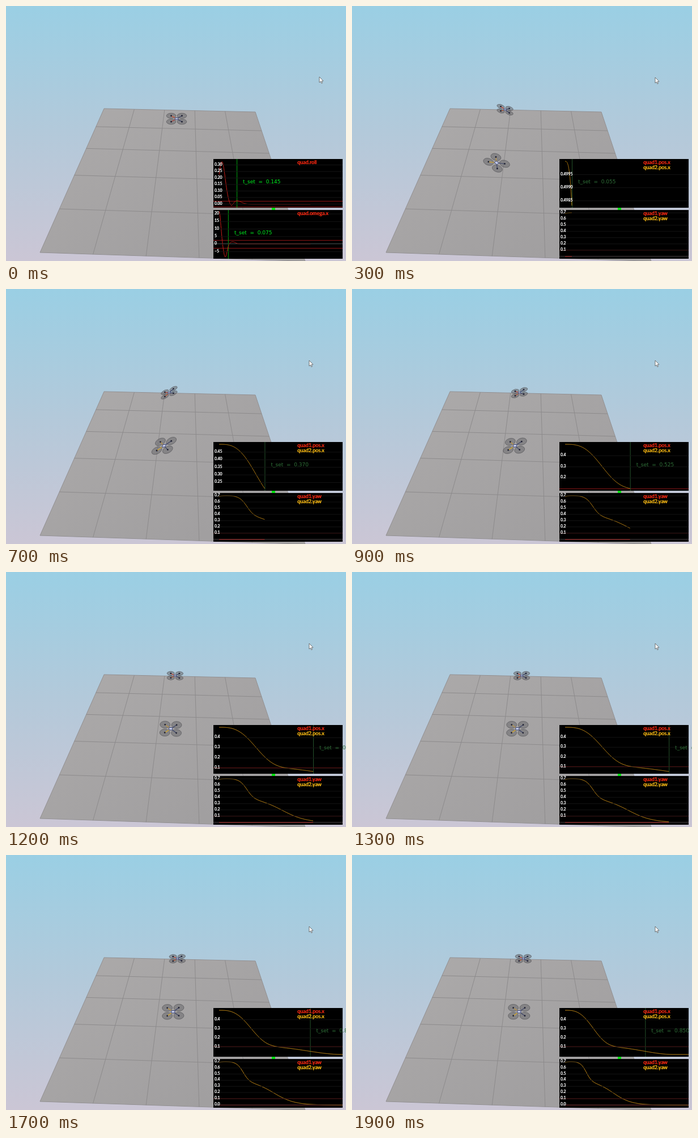
Animation, 600 px wide and 450 px high, one loop 2000 ms. Source, as an HTML page with a canvas:

```html
<!DOCTYPE html>
<html lang="en">
<head>
<meta charset="utf-8">
<title>Quadrotor simulation</title>
<style>
html, body { margin: 0; width: 100%; height: 100%; overflow: hidden; }
canvas { display: block; width: 600px; height: 450px; }
</style>
</head>
<body>
<canvas id="stage" width="600" height="450"></canvas>
<script>
const ctx = document.getElementById('stage').getContext('2d');
const X0 = 376, SPAN = 218;      // plot origin and pixels per second
const RED = '#ff2a12', YELLOW = '#ffbe14', RED_TRACE = '#cc1f18', ORANGE_TRACE = '#dc9a1a';
const DARK_RED = '#8f1414', GRID = '#141414';
const SETTLED = 0.85;

const bump = (t, center, width) => Math.exp(-(((t - center) / width) ** 2));
const logistic = (t, center, width) => 1 / (1 + Math.exp((center - t) / width));
const smooth = (t, from, to) => {
  const u = Math.min(1, Math.max(0, (t - from) / (to - from)));
  return u * u * (3 - 2 * u);
};

// Distance flown: a quick approach followed by a slow correction.
const flown = t => 0.407 * (1 - Math.exp(-25 * t ** 3)) + 0.0785 * smooth(t, 0.5, 1.15);
const accel = (t, h = 0.02) => (flown(t + h) - 2 * flown(t) + flown(t - h)) / (h * h);

// Plot heights in pixels against time.
const yawY = t => 364 + 35 * logistic(t, 0.225, 0.03) + 43 * logistic(t, 0.511, 0.096) + 2 * Math.exp(-t / 0.03);
const rollY = t => 349.8 - 75 * bump(t, 0.023, 0.038) + 6 * bump(t, 0.1, 0.02) - 6 * bump(t, 0.145, 0.05);
const omegaY = t => 420 - 58 * bump(t, 0, 0.02) + 23 * bump(t, 0.05, 0.02) - 4 * bump(t, 0.11, 0.03);
const yawAngle = t => Math.max(0, (441.8 - yawY(t)) / 110);

function line(color, x1, y1, x2, y2, width = 1) {
  ctx.strokeStyle = color;
  ctx.lineWidth = width;
  ctx.beginPath();
  ctx.moveTo(x1, y1);
  ctx.lineTo(x2, y2);
  ctx.stroke();
}

function shape(points, fill, stroke, width) {
  ctx.beginPath();
  points.forEach(p => ctx.lineTo(p[0], p[1]));
  ctx.closePath();
  ctx.fillStyle = fill;
  ctx.fill();
  ctx.strokeStyle = stroke;
  ctx.lineWidth = width;
  ctx.stroke();
}

function text(str, x, y, color, font) {
  ctx.font = font;
  ctx.fillStyle = color;
  ctx.fillText(str, x, y);
}

// Plot lettering is overprinted with a slight shift.
function overprint(str, x, y, color, size) {
  for (const dx of [0, 0.5]) text(str, x + dx, y, color, size + 'px Lato, sans-serif');
}
const label = (str, y) => overprint(str, 367.8, y + 2.5, '#fff', 6.8);
const heading = (str, y, color) => overprint(str, 514, y + 3, color, 9);

function world() {
  const sky = ctx.createLinearGradient(0, 0, 0, 450);
  sky.addColorStop(0, '#9acfe4');
  sky.addColorStop(0.5, '#b3c9da');
  sky.addColorStop(1, '#cbc6d5');
  ctx.fillStyle = sky;
  ctx.fillRect(0, 0, 600, 450);

  const mix = (p, q, u) => [p[0] + (q[0] - p[0]) * u, p[1] + (q[1] - p[1]) * u];
  const tl = [173, 181], tr = [440, 187], bl = [60, 435], br = [528, 450.5];
  const floor = ctx.createLinearGradient(150, 181, 330, 450);
  floor.addColorStop(0, '#aba9a9');
  floor.addColorStop(1, '#a19fa0');
  shape([tl, tr, br, bl], floor, '#929092', 1);
  for (let k = 1; k < 5; k++) {
    const across = k / 5, deep = k / (k + (5 - k) * 1.74);
    line('#8d8b8c', ...mix(tl, tr, across), ...mix(bl, br, across));
    line('#8d8b8c', ...mix(tl, bl, deep), ...mix(tr, br, deep));
  }
  ctx.fillStyle = '#00e010';
  ctx.fillRect(469, 355, 6, 6);
}

// rx, ry: rotor circle as seen by the camera; tilt lowers the right-hand side.
function drone(x, y, rx, ry, yaw, tilt, arms) {
  const project = angle => {
    const px = rx * Math.cos(angle);
    return [px, ry * Math.sin(angle) + tilt * px];
  };
  const quarter = Math.PI / 2;
  const hubs = [-3, -1, 1, 3].map(k => project(k * quarter / 2 + yaw));
  const [a, b] = hubs;
  const colors = [arms[0], '#3c4468', '#3c4468', arms[1]];
  ctx.save();
  ctx.translate(x, y);
  hubs.forEach(([hx, hy], i) => {
    // The rotor disc lies in the plane of the two diagonals.
    ctx.save();
    ctx.transform(...a, ...b, hx, hy);
    ctx.beginPath();
    ctx.arc(0, 0, 0.62, 0, 2 * Math.PI);
    ctx.restore();
    ctx.fillStyle = 'rgba(105,105,110,0.55)';
    ctx.fill();
    ctx.strokeStyle = 'rgba(70,70,75,0.7)';
    ctx.lineWidth = 0.8;
    ctx.stroke();
    line(colors[i], 0, 0, hx, hy, 1.1);
    ctx.beginPath();
    ctx.arc(hx, hy, 1.4, 0, 2 * Math.PI);
    ctx.fillStyle = '#202233';
    ctx.fill();
  });
  const body = [0, 1, 2, 3].map(k => project((k + 0.5) * quarter + yaw).map(v => v * 0.3));
  shape(body, '#c4cbe8', '#39426e', 1);
  ctx.restore();
}

function cursor(x, y) {
  const arrow = [[0, 0], [0, 10], [2.3, 8], [3.9, 11.4], [5.4, 10.8], [3.9, 7.4], [6.9, 7.2]];
  shape(arrow.map(p => [x + p[0], y + p[1]]), '#fff', '#555', 0.8);
}

function panel(y, draw) {
  ctx.save();
  ctx.beginPath();
  ctx.rect(366, y, 228, 86);
  ctx.clip();
  ctx.fillStyle = '#000';
  ctx.fillRect(366, y, 228, 86);
  draw();
  ctx.restore();
}

const level = (color, y) => line(color, 366, y, 594, y);

function trace(color, end, f, width = SPAN) {
  ctx.strokeStyle = color;
  ctx.lineWidth = 1;
  ctx.beginPath();
  for (let i = 0; i <= 400; i++) ctx.lineTo(X0 + width * end * i / 400, f(end * i / 400));
  ctx.stroke();
}

// Evenly spaced axis marks counting down from the top value.
function axis(count, top, drop, y, gap, digits) {
  for (let i = 0; i < count; i++) {
    level(GRID, y + gap * i + 1.5);
    const v = top - drop * i;
    label((v < -1e-9 ? '\u2212' : '') + Math.abs(v).toFixed(digits), y + gap * i);
  }
}

function settle(x, y, time, color) {
  text('t_set  =  ' + time.toFixed(3), x + 11, y + 3.3, color, '9px "DejaVu Sans", sans-serif');
}

function singleQuad() {
  const marker = (t, y) => line('#00a410', X0 + SPAN * t, y, X0 + SPAN * t, y + 86);
  drone(301, 199, 13.4, 7.4, 0, 0, ['#e0502a', '#b04038']);
  panel(270, () => {
    level(DARK_RED, 344.5);
    level(DARK_RED, 354.5);
    marker(0.145, 270);
    trace(RED_TRACE, 0.74, rollY);
    axis(7, 0.3, 0.05, 279, 11.5, 2);
    heading('quad.roll', 275.5, RED);
  });
  panel(360, () => {
    level(DARK_RED, 413.5);
    level(DARK_RED, 427.5);
    level('#55605f', 419.5);
    marker(0.075, 360);
    trace(RED_TRACE, 0.74, omegaY);
    axis(6, 20, 5, 365.5, 13.3, 0);
    heading('quad.omega.x', 366, RED);
  });
  settle(407, 310, 0.145, '#00f020');
  settle(392, 400, 0.075, '#00f020');
}

// Smallest 1-2-5 step giving at most six divisions.
function niceStep(span) {
  const base = 10 ** Math.floor(Math.log10(span / 6));
  return [1, 2, 5, 10].map(k => k * base).find(s => span / s <= 6);
}

function twinQuads(step) {
  const t = Math.max(0.02 * Math.min(step, 2), 0.055 + 0.0785 * (step - 3));
  const span = flown(t), width = SPAN / Math.max(1, t);
  const posY = d => 274 + 78 * d / span;
  const setX = X0 + width * Math.min(t, SETTLED);
  const setTime = Math.min(SETTLED, Math.round(t * 200) / 200);

  drone(270 + 54 * span + 26 * span * span, 183, 10.7, 5.6, 0, 0.07 * accel(t), ['#d8452c', '#b8542c']);
  drone(255 + 82 * span, 276.7, 14.4, 10, yawAngle(t), 0.055 * accel(t), ['#c99a3a', '#e0ae22']);

  panel(270, () => {
    const tick = niceStep(span), digits = -Math.floor(Math.log10(tick) + 1e-9);
    const first = 0.5 - (Math.ceil(0.5 / tick - 1e-6) - 1) * tick;
    const count = Math.floor((span - first) / tick + 1);
    level(DARK_RED, posY(0.4));
    line('#24502a', setX + 0.5, 270, setX + 0.5, 356);
    trace(ORANGE_TRACE, t, s => posY(flown(s)), width);
    axis(count, 0.5 - first, tick, posY(first) - 1, posY(tick) - 274, digits);
    heading('quad1.pos.x', 276, RED);
    heading('quad2.pos.x', 285, YELLOW);
  });

  panel(360, () => {
    const below = t > 1.05, k = below ? 0.988 : 1;
    const fit = y => 364 + (y - 364) * k;
    level(DARK_RED, fit(430.7));
    level('#4a4244', fit(441.8));
    line('#b02a26', X0, fit(442), X0 + width * t, fit(442));
    trace(ORANGE_TRACE, t, s => fit(yawY(s)), width);
    axis(below ? 8 : 7, 0.7, 0.1, 363.5, 10.95 * k, 1);
    heading('quad1.yaw', 366, RED);
    heading('quad2.yaw', 375, YELLOW);
  });
  settle(setX, 310, setTime, '#2f7038');
}

const start = performance.now();
function frame() {
  const step = Math.floor((performance.now() - start) / 100) % 20;
  world();
  if (step === 0) singleQuad();
  else twinQuads(step);
  cursor(Math.max(535, 553 - 7 * step), step ? 126 : 125);
  requestAnimationFrame(frame);
}
frame();
</script>
</body>
</html>
```
